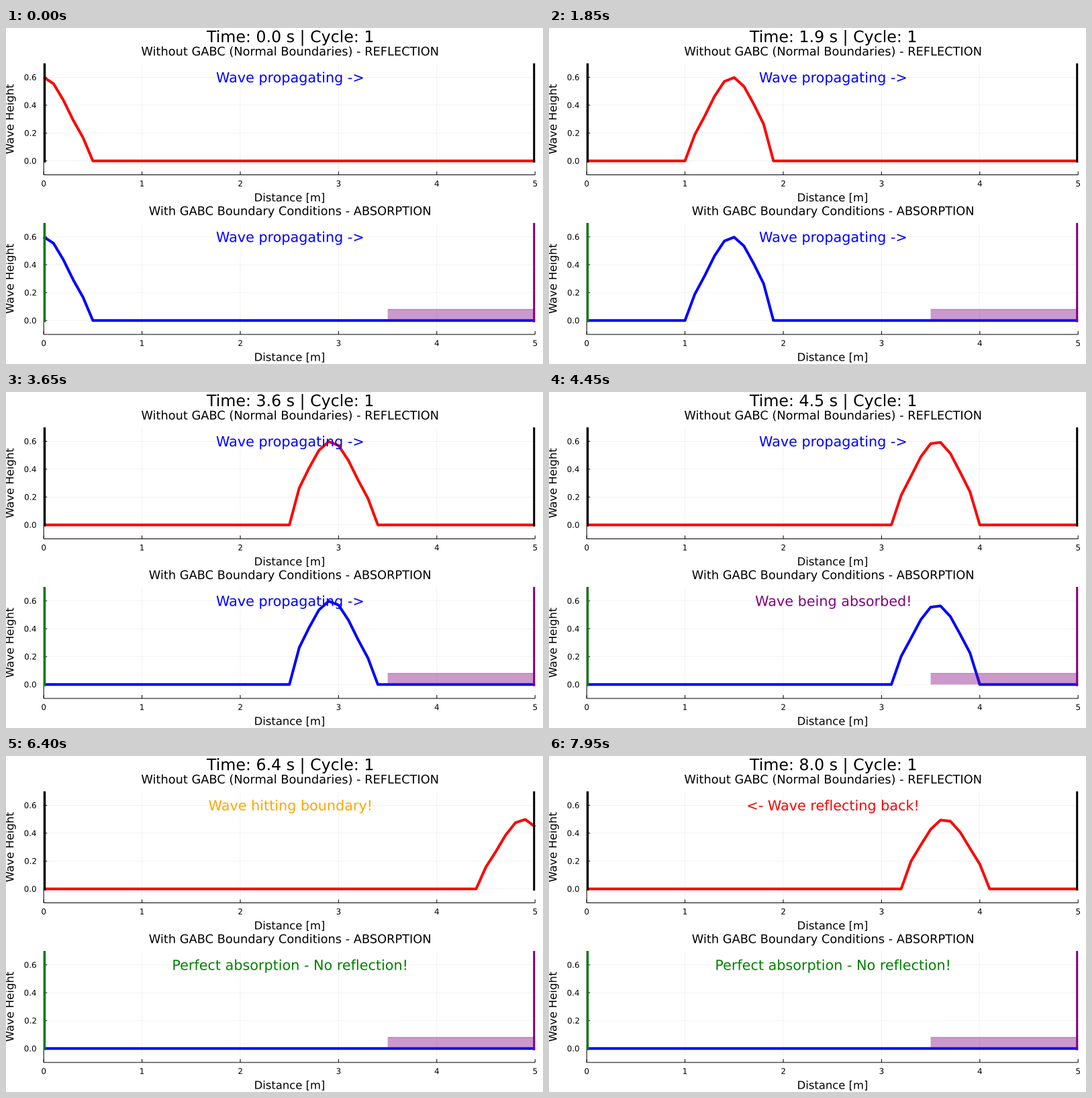
Write a matplotlib script that moves like this. It is 800 px wide and 500 px high and loops after 8 s.

```python
import numpy as np
import matplotlib.pyplot as plt
from matplotlib.animation import FuncAnimation
from matplotlib.patches import PathPatch, Rectangle
from matplotlib.textpath import TextPath
from matplotlib.transforms import Affine2D

W, H, DPI = 800, 500, 100
FRAMES, STEP_MS = 160, 50
PX = 72 / DPI                       # points per pixel
LEFT, RIGHT, HEIGHT = 56.2, 788.2, 165.9
TOPS = (52.6, 290.1)
MID = 422.6
LENGTH, SPEED, SIGMA, REACH = 5.0, 0.8, 0.25, 0.4
ZONE = 3.5
UNIT = HEIGHT / 0.8                 # pixels per unit of wave height

plt.rcParams["font.family"] = "DejaVu Sans"
plt.rcParams["path.snap"] = False
x = np.arange(51) / 10

# One canvas in pixel coordinates; artists stack in the order they are added.
fig = plt.figure(figsize=(W / DPI, H / DPI), dpi=DPI, facecolor="white")
ax = fig.add_axes([0, 0, 1, 1])
ax.set(xlim=(0, W), ylim=(H, 0))
ax.axis("off")


def sx(d):
    return LEFT + d * (RIGHT - LEFT) / LENGTH


def glyphs(s, size, px, py, align=0.5, angle=0):
    """Outline of a text whose ink is aligned at px, with its baseline at py."""
    path = TextPath((0, 0), s, size=size)
    box = path.get_extents()
    shift = -(box.x0 + align * box.width)
    move = Affine2D().translate(shift, 0).rotate_deg(angle)
    return path.transformed(move.scale(1, -1).translate(px, py))


def put(s, size, px, py, **kw):
    return ax.add_patch(PathPatch(glyphs(s, size, px, py, **kw),
                                  fc="black", lw=0, zorder=2))


def rule(xs, ys, width=1.0, color="black", alpha=1):
    line, = ax.plot(xs, ys, color=color, lw=width * PX, alpha=alpha,
                    solid_capstyle="butt", zorder=2)
    return line


def block(x0, y0, x1, y1, color, alpha=1):
    ax.add_patch(Rectangle((x0, y0), x1 - x0, y1 - y0, fc=color,
                           alpha=alpha, lw=0, zorder=2))


def panel(top, title, color, walls, zone=False):
    bottom, zero = top + HEIGHT, top + 0.7 * UNIT
    levels = [zero - k * 0.2 * UNIT for k in range(4)]

    for k in range(6):
        rule([sx(k)] * 2, [top, bottom], 0.5, alpha=0.1)
    for y in levels:
        rule([LEFT, RIGHT], [y, y], 0.5, alpha=0.1)
    rule([LEFT, RIGHT], [bottom, bottom])
    rule([LEFT, LEFT], [top, bottom])
    for k in range(6):
        rule([sx(k)] * 2, [bottom, bottom - 5])
        put(str(k), 11.85, sx(k), bottom + 17.2)
    for k, y in enumerate(levels):
        rule([LEFT, LEFT + 5], [y, y])
        put(f"{k * 0.2:.1f}", 11.85, 44.8, y + 4.3, align=1)

    put(title, 17.78, MID, top - 11.7)
    put("Distance [m]", 16.4, MID, top + 205.4)
    put("Wave Height", 16.4, 11.3, top + HEIGHT / 2, angle=90)

    curve = rule(sx(x), 0 * x + zero, 4, color)
    if zone:
        edge = zero - 0.08 * UNIT
        block(sx(ZONE), edge, RIGHT, zero, "purple", 0.4)
        rule([sx(ZONE), RIGHT], [edge, edge], 1, "purple", 0.4)
    block(LEFT, top, LEFT + 3, zero + 2.5, walls[0])
    block(RIGHT - 3, top, RIGHT, zero + 2.5, walls[1])
    return curve, zero, put("-", 20.74, MID, top + 28.3)


red, red_zero, red_note = panel(
    TOPS[0], "Without GABC (Normal Boundaries) - REFLECTION",
    "red", ("black", "black"))
blue, blue_zero, blue_note = panel(
    TOPS[1], "With GABC Boundary Conditions - ABSORPTION",
    "blue", ("green", "purple"), zone=True)
clock = put("-", 23.7, MID, 21.1)

# (start time, text, colour)
RED_NOTES = [(0, "Wave propagating ->", "blue"),
             (5.5, "Wave hitting boundary!", "orange"),
             (6.5, "<- Wave reflecting back!", "red")]
BLUE_NOTES = [(0, "Wave propagating ->", "blue"),
              (4.0, "Wave being absorbed!", "purple"),
              (6.0, "Perfect absorption - No reflection!", "green")]


def pulse(center, amp):
    d = x - center
    return np.where(np.abs(d) <= REACH, amp * np.exp(-d**2 / (2 * SIGMA**2)), 0)


def show_note(patch, notes, t, top):
    _, text, color = [n for n in notes if n[0] <= t][-1]
    patch.set_path(glyphs(text, 20.74, MID, top + 28.3))
    patch.set_facecolor(color)


def update(i):
    t = i / 20
    pos = SPEED * t
    if pos <= LENGTH:
        wave = pulse(pos, 0.6)
    else:
        wave = pulse(2 * LENGTH - pos, 0.5)
    damping = np.clip(1 - 0.8 * (pos - ZONE), 0, 1)
    red.set_ydata(red_zero - UNIT * wave)
    blue.set_ydata(blue_zero - UNIT * pulse(pos, 0.6 * damping))
    show_note(red_note, RED_NOTES, t, TOPS[0])
    show_note(blue_note, BLUE_NOTES, t, TOPS[1])
    clock.set_path(glyphs(f"Time: {t:.1f} s | Cycle: 1", 23.7, MID, 21.1))
    return red, blue, red_note, blue_note, clock


anim = FuncAnimation(fig, update, frames=FRAMES, interval=STEP_MS,
                     repeat=True, repeat_delay=0, blit=False)
plt.show()
```
